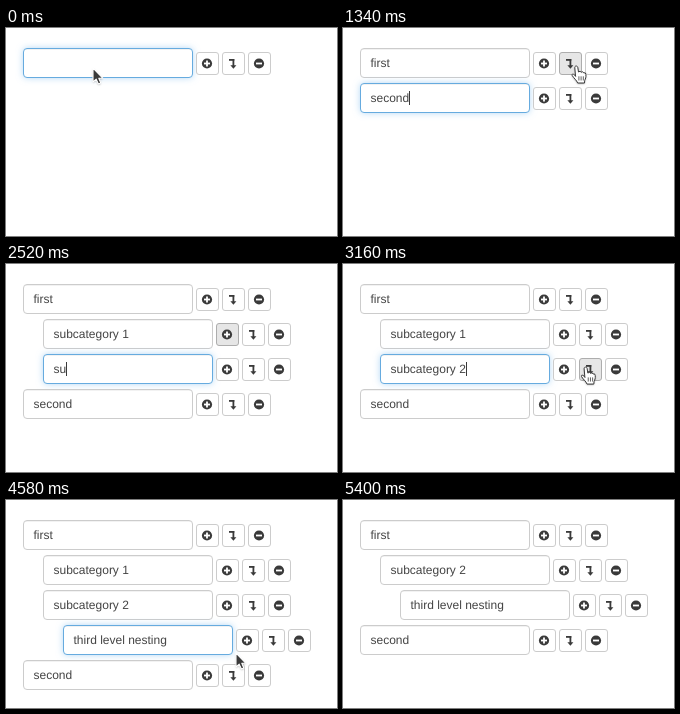
These frames come from a looping animation (331 by 208 pixels, 5420 ms). An HTML page with a canvas:

```html
<!DOCTYPE html>
<html lang="en">
<head>
<meta charset="utf-8">
<title>Nested list editor</title>
<style>
html, body { margin: 0; width: 100%; height: 100%; overflow: hidden; background: #fff; }
canvas { display: block; width: 331px; height: 208px; }
</style>
</head>
<body>
<canvas id="stage"></canvas>
<script>
const W = 331, H = 208, LOOP = 5420;
const BLINK = 270;
const INK = '#3a3a3a';
const PLUS = 0, DOWN = 1, MINUS = 2;
const canvas = document.getElementById('stage');
const ratio = window.devicePixelRatio || 1;
canvas.width = Math.round(W * ratio);
canvas.height = Math.round(H * ratio);
const ctx = canvas.getContext('2d');

const rowX = level => 17 + level * 20;
const rowY = row => 20 + row * 35;
const buttonX = (level, kind) => rowX(level) + 173 + kind * 26;
const buttonY = row => rowY(row) + 4;

// added: when the row appears; type: first key; step: ms per key.
const first = { text: 'first', level: 0, added: 0, type: 100, step: 50 };
const second = { text: 'second', level: 0, added: 620, type: 740, step: 70 };
const sub1 = { text: 'subcategory 1', level: 1, added: 1400, type: 1500, step: 40, removed: 4950 };
const sub2 = { text: 'subcategory 2', level: 1, added: 2310, type: 2460, step: 40 };
const third = { text: 'third level nesting', level: 2, added: 3270, type: 3480, step: 34 };
const items = [first, sub1, sub2, third, second];
const focusOrder = [first, second, sub1, sub2, third];
const BLUR_AT = sub1.removed - 20;

const move = (start, end, x, y) => ({ start, end, x, y });
const toButton = (start, end, level, row, kind, dx = 11, dy = 14) =>
  move(start, end, buttonX(level, kind) + dx, buttonY(row) + dy);

const moves = [
  move(0, 1, 87, 40),
  toButton(340, 540, 0, 0, PLUS),
  toButton(1120, 1300, 0, 0, DOWN, 18),
  toButton(2020, 2260, 1, 1, PLUS),
  toButton(2970, 3220, 1, 2, DOWN),
  move(3300, 3470, 252, 155),
  move(4200, 4560, 230, 153),
  toButton(4640, 4900, 1, 1, MINUS, 14, 22),
  move(5040, 5180, W + 14, 80)
];

// The pointer hides at the first key and returns with the next move.
function pointerAt(t) {
  const i = moves.findLastIndex(m => t >= m.start);
  const to = moves[i], from = moves[Math.max(0, i - 1)];
  const p = Math.min(1, (t - to.start) / (to.end - to.start));
  const e = p * p * (3 - 2 * p);
  return {
    x: from.x + (to.x - from.x) * e,
    y: from.y + (to.y - from.y) * e,
    shown: !items.some(item => item.type > to.start && item.type <= t)
  };
}

function typedCount(item, t) {
  if (t < item.type) return 0;
  return Math.min(item.text.length, Math.floor((t - item.type) / item.step) + 1);
}

function box(x, y, w, h, r) {
  ctx.beginPath();
  ctx.roundRect(x + 0.5, y + 0.5, w - 1, h - 1, r);
}

function drawInput(x, y, item, focused, t) {
  ctx.save();
  if (focused) {
    ctx.shadowColor = 'rgba(102,175,233,.55)';
    ctx.shadowBlur = 7 * ratio;
  }
  box(x, y, 170, 30, 3.5);
  ctx.fillStyle = '#fff';
  ctx.fill();
  ctx.restore();
  ctx.fillStyle = 'rgba(0,0,0,.05)';
  ctx.fillRect(x + 2, y + 1, 166, 1);
  box(x, y, 170, 30, 3.5);
  ctx.strokeStyle = focused ? '#66abdf' : '#ccc';
  ctx.stroke();

  const count = typedCount(item, t);
  const text = item.text.slice(0, count);
  ctx.font = '12px "Liberation Sans", Arial, sans-serif';
  ctx.textRendering = 'geometricPrecision';
  ctx.fillStyle = '#444';
  ctx.fillText(text, x + 10.5, y + 19);
  if (focused && count) {
    const idle = t - (item.type + (count - 1) * item.step);
    if (idle % (2 * BLINK) < BLINK) {
      ctx.fillStyle = INK;
      ctx.fillRect(Math.round(x + 10.5 + ctx.measureText(text).width), y + 8, 1, 14);
    }
  }
}

function drawDisc(cx, cy, plus) {
  ctx.fillStyle = INK;
  ctx.beginPath();
  ctx.arc(cx, cy, 5.1, 0, Math.PI * 2);
  ctx.fill();
  ctx.fillStyle = '#fff';
  ctx.fillRect(cx - 3, cy - 0.9, 6, 1.8);
  if (plus) ctx.fillRect(cx - 0.9, cy - 3, 1.8, 6);
}

function drawDown(cx, cy) {
  ctx.fillStyle = INK;
  ctx.fillRect(cx - 4, cy - 4.5, 5.3, 1.8);
  ctx.fillRect(cx - 0.5, cy - 4.5, 1.8, 7);
  ctx.beginPath();
  ctx.moveTo(cx - 2.6, cy + 1.8);
  ctx.lineTo(cx + 3.4, cy + 1.8);
  ctx.lineTo(cx + 0.4, cy + 5.3);
  ctx.fill();
}

function drawButton(x, y, kind, mouse) {
  const over = mouse.x >= x && mouse.x < x + 23 && mouse.y >= y && mouse.y < y + 23;
  box(x, y, 23, 23, 2.5);
  ctx.fillStyle = over ? '#e6e6e6' : '#fff';
  ctx.fill();
  ctx.strokeStyle = over ? '#adadad' : '#ccc';
  ctx.stroke();
  if (kind === DOWN) drawDown(x + 11, y + 11.5);
  else drawDisc(x + 11, y + 11.5, kind === PLUS);
  return over;
}

function castShadow() {
  ctx.shadowColor = 'rgba(0,0,0,.35)';
  ctx.shadowBlur = 2 * ratio;
  ctx.shadowOffsetY = ratio;
}

function drawArrow(x, y) {
  ctx.save();
  ctx.translate(x, y);
  ctx.lineJoin = 'round';
  ctx.beginPath();
  ctx.moveTo(0, 0);
  ctx.lineTo(0, 14);
  ctx.lineTo(3.2, 11.2);
  ctx.lineTo(5.4, 16);
  ctx.lineTo(7.8, 15);
  ctx.lineTo(5.8, 10.2);
  ctx.lineTo(9.8, 10.2);
  ctx.closePath();
  castShadow();
  ctx.fillStyle = INK;
  ctx.fill();
  ctx.shadowColor = 'transparent';
  ctx.lineWidth = 1.1;
  ctx.strokeStyle = '#fff';
  ctx.stroke();
  ctx.restore();
}

function drawHand(x, y) {
  ctx.save();
  ctx.translate(x - 5.5, y - 0.5);
  ctx.lineJoin = ctx.lineCap = 'round';
  ctx.beginPath();
  ctx.moveTo(4, 10.5);
  ctx.lineTo(3.3, 2.2);
  ctx.bezierCurveTo(3.1, 0, 6, 0, 6.3, 2);
  ctx.lineTo(7, 6.5);
  ctx.quadraticCurveTo(8.8, 4.8, 9.7, 6.8);
  ctx.quadraticCurveTo(11.4, 5.3, 12.2, 7.4);
  ctx.quadraticCurveTo(14.2, 6.5, 14.4, 9);
  ctx.bezierCurveTo(14.7, 12, 14, 13, 13.2, 15);
  ctx.lineTo(13, 17.5);
  ctx.lineTo(6.2, 17.5);
  ctx.bezierCurveTo(5, 14.5, 2.5, 13, 0.7, 10);
  ctx.bezierCurveTo(0, 8, 2.3, 8, 4, 10.5);
  ctx.closePath();
  castShadow();
  ctx.fillStyle = '#fff';
  ctx.fill();
  ctx.shadowColor = 'transparent';
  ctx.strokeStyle = INK;
  ctx.stroke();
  ctx.lineWidth = 0.8;
  ctx.beginPath();
  for (let fx = 7.4; fx < 12; fx += 2.2) {
    ctx.moveTo(fx, 11.2);
    ctx.lineTo(fx, 14.6);
  }
  ctx.stroke();
  ctx.restore();
}

function draw(t) {
  ctx.setTransform(canvas.width / W, 0, 0, canvas.height / H, 0, 0);
  ctx.fillStyle = '#fff';
  ctx.fillRect(0, 0, W, H);
  ctx.lineWidth = 1;

  const mouse = pointerAt(t);
  const focus = t < BLUR_AT ? focusOrder.findLast(item => t >= item.added) : null;
  const visible = items.filter(item => t >= item.added && !(t >= item.removed));
  let overButton = false;
  visible.forEach((item, row) => {
    drawInput(rowX(item.level), rowY(row), item, item === focus, t);
    for (const kind of [PLUS, DOWN, MINUS]) {
      if (drawButton(buttonX(item.level, kind), buttonY(row), kind, mouse)) overButton = true;
    }
  });

  if (mouse.shown) (overButton ? drawHand : drawArrow)(mouse.x, mouse.y);
}

function tick() {
  draw(performance.now() % LOOP);
  requestAnimationFrame(tick);
}
tick();
</script>
</body>
</html>
```
